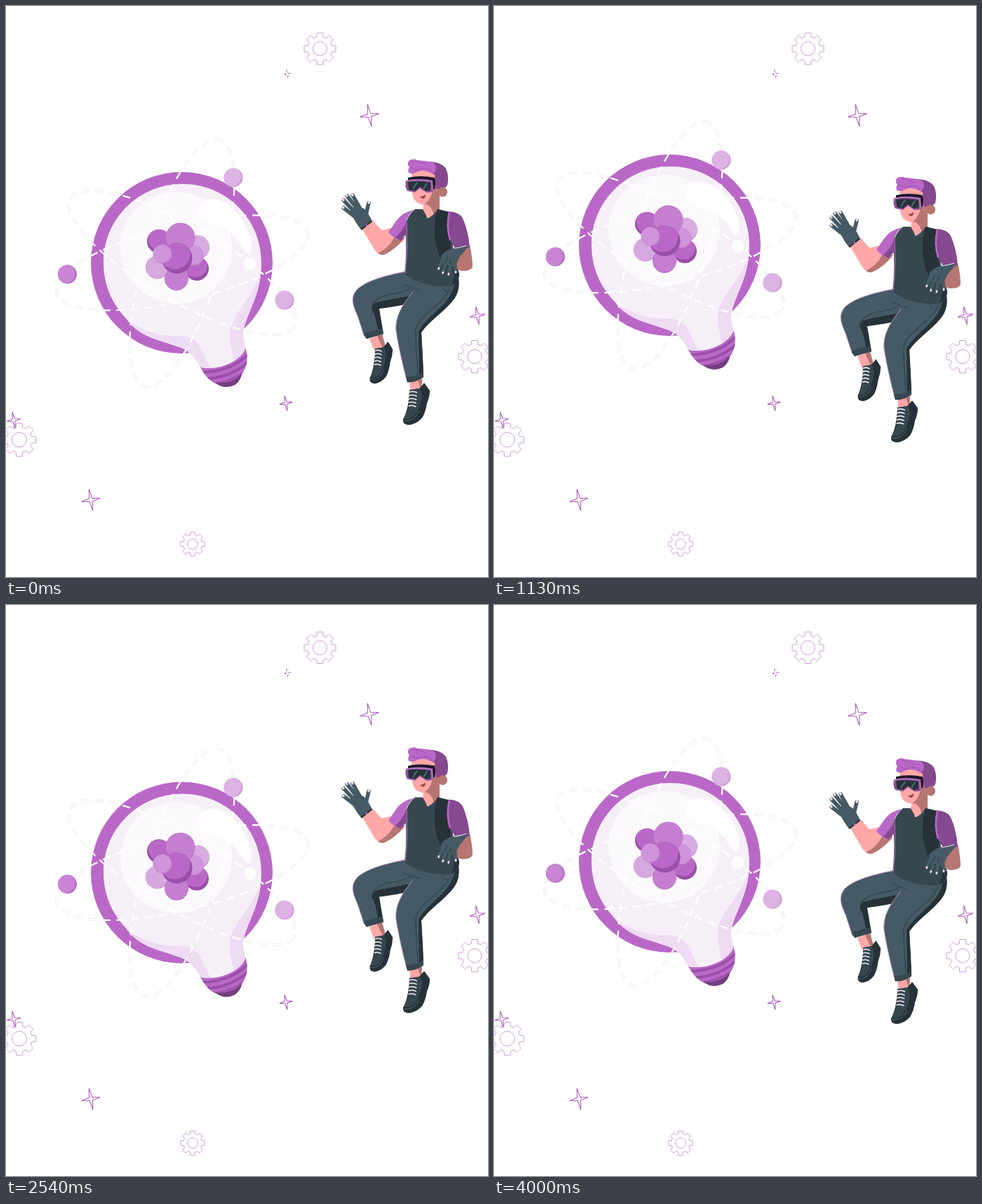
Recreate the animation shown at these times as an HTML page with a canvas. Size 687x815 px, loop 4.21 s.

```html
<!DOCTYPE html>
<html lang="en">
<head>
<meta charset="utf-8">
<title>Floating idea</title>
<style>
html, body { margin: 0; width: 100%; height: 100%; overflow: hidden; background: #fff; }
canvas { display: block; }
</style>
</head>
<body>
<canvas id="stage" width="687" height="815"></canvas>
<script>
const ctx = document.getElementById('stage').getContext('2d');
const TAU = Math.PI * 2;
const LOOP = 4210, SWING = 4000, FPS = 24, REACH = 28.5;
const PURPLE = '#ba68c8', PLUM = '#9a4fa8', DEEP = '#85498f';
const SKIN = '#ffa8a7', TAN = '#b77672';
const SLATE = '#455a64', STEEL = '#37474f', INK = '#263238';

function fill(color, d) {
  ctx.fillStyle = color;
  ctx.fill(new Path2D(d));
}

function line(color, width, d) {
  ctx.strokeStyle = color;
  ctx.lineWidth = width;
  ctx.stroke(new Path2D(d));
}

function disc(color, x, y, rx, ry = rx, turn = 0) {
  ctx.fillStyle = color;
  ctx.beginPath();
  ctx.ellipse(x, y, rx, ry, turn, 0, TAU);
  ctx.fill();
}

// Disc with a darker crescent left where the lit disc is shifted away.
function ball(x, y, r, color, shade, dx, dy) {
  ctx.save();
  ctx.beginPath();
  ctx.arc(x, y, r, 0, TAU);
  ctx.clip();
  disc(shade, x, y, r + 1);
  disc(color, x + dx, y + dy, r);
  ctx.restore();
}

function gear(x, y, r, hole) {
  ctx.strokeStyle = '#cf9ddb';
  ctx.lineWidth = 1;
  ctx.beginPath();
  for (let i = 0; i < 8; i++) {
    const a = i * TAU / 8 - TAU / 4;
    for (const [da, k] of [[-0.27, 0.76], [-0.18, 1], [0.18, 1], [0.27, 0.76]]) {
      ctx.lineTo(x + Math.cos(a + da) * r * k, y + Math.sin(a + da) * r * k);
    }
  }
  ctx.closePath();
  ctx.moveTo(x + hole, y);
  ctx.arc(x, y, hole, 0, TAU);
  ctx.stroke();
}

function star(x, y, r, color = '#a94fba') {
  ctx.save();
  ctx.translate(x, y);
  ctx.rotate(-0.18);
  ctx.strokeStyle = color;
  ctx.lineWidth = 1;
  ctx.lineJoin = 'bevel';
  ctx.beginPath();
  for (let i = 0; i < 8; i++) {
    const a = i * TAU / 8, k = i % 2 ? r * 0.2 : r * (i % 4 ? 0.86 : 1);
    ctx.lineTo(Math.sin(a) * k, -Math.cos(a) * k);
  }
  ctx.closePath();
  ctx.stroke();
  ctx.restore();
}

function backdrop() {
  gear(447.5, 61, 23, 10);
  gear(668, 500.5, 23.5, 10);
  gear(19, 619, 24, 10.5);
  gear(266, 768, 17.5, 7.5);
  star(518, 156, 16);
  star(672, 442, 13);
  star(399, 567, 11);
  star(121, 705, 15.5);
  star(11, 591, 12);
  ctx.setLineDash([2, 3]);
  star(401, 97, 6);
  ctx.setLineDash([]);
}

function orbit(deg, shift) {
  ctx.setLineDash([11.5, 8.5]);
  ctx.lineDashOffset = shift;
  ctx.beginPath();
  ctx.ellipse(251, 366.5, 184, 54, deg * TAU / 360, 0, TAU);
  // Faint rim outside the bulb, so that the white dashes show there.
  ctx.save();
  const rim = new Path2D('M0 0H687V815H0Z');
  rim.arc(250.5, 366.5, 130, 0, TAU);
  ctx.clip(rim, 'evenodd');
  ctx.strokeStyle = '#dfd3e3';
  ctx.lineWidth = 3.2;
  ctx.stroke();
  ctx.restore();
  ctx.strokeStyle = '#fff';
  ctx.lineWidth = 2.3;
  ctx.stroke();
  ctx.setLineDash([]);
}

const GLASS = 'M251.500 254C314 254 364 304 364 366C364 419 338 442 338 472L341 489' +
  'C336 504 309 521 278 516C271 506 265 494 250 488C220 477 190 473 172 447' +
  'C151 425 139 398 139 366C139 304 189 254 251.500 254Z';

function bulb() {
  disc(PURPLE, 250.5, 366.5, 129.5);

  // Screw base
  fill('#743d80', 'M294 536Q318 537 337 522Q335 535 326 541Q313 547 303 541Z');
  ctx.save();
  ctx.clip(new Path2D('M276 514Q313 515 341 487Q345 497 343 510Q341 520 335 526Q319 541 295 537Q285 531 276 514Z'));
  ctx.fillStyle = PURPLE;
  ctx.fillRect(270, 485, 80, 60);
  line(PLUM, 4, 'M276 523Q320 523 346 496');
  line(PLUM, 4, 'M282 532Q322 531 347 506');
  line(PLUM, 2.500, 'M290 539Q324 537 345 517');
  ctx.restore();

  fill('#f6eff8', GLASS);
  ctx.save();
  ctx.clip(new Path2D(GLASS));
  fill('#eedcf3', 'M158 432C186 466 220 472 252 471C280 474 276 494 297 525L270 530L230 495L165 460Z');
  fill('#eedcf3', 'M366 366C360 412 320 438 319 467C318 484 325 493 325 523L350 500L370 410Z');
  ctx.restore();
  disc('#fcf9fd', 242.5, 345, 79.5);
  fill('#fff', 'M274 293C274 279 288 274 300 276C322 280 347 311 350 341C350 353 343 355 338 347' +
    'C331 333 320 320 304 314C288 311 274 304 274 293Z');
  disc('#fff', 347.5, 368, 8.5, 9.5);

  orbit(-73, 4);
  orbit(30, -1);
  orbit(-13.5, 3);

  ball(218, 336, 17, PURPLE, PLUM, 2, -3);
  ball(273, 344.5, 17, '#d9ace1', '#cd91d8', 0, -2);
  ball(215.500, 373, 16.5, '#d7a8df', '#cd91d8', -1, -1);
  ball(272, 375, 17, PURPLE, PLUM, -2, -5);
  ball(243, 389, 17, '#c57fd1', '#b66bc4', 0, -1);
  ball(267, 356, 14.5, '#cf94da', '#c57fd1', 0, -1);
  ball(248.5, 330.5, 21, '#c57fd1', '#b66bc4', 0, -1);
  ball(243.5, 360, 22, PURPLE, PLUM, -3, -6);
  ball(223, 354, 13.5, '#cf94da', '#c57fd1', -1, -1);

  ball(324, 245, 13.5, '#ddb3e4', '#cd98d7', -2, -1);
  ball(87.5, 383, 13.5, '#c985d4', '#b873c5', -3, -1);
  ball(397, 420, 13.5, '#ddb3e4', '#cd98d7', -2, -1);
}

// Gloved fingers with pale nails; each is [base x, base y, tip x, tip y].
function fingers(list, width) {
  ctx.lineCap = 'round';
  for (const [x, y, u, v] of list) {
    line(SLATE, width, `M${x} ${y}L${u} ${v}`);
    const k = 1.5 / Math.hypot(u - x, v - y);
    line('#eadcef', width * 0.6, `M${u} ${v}l${(u - x) * k} ${(v - y) * k}`);
  }
  ctx.lineCap = 'butt';
}

function shoe(x, y, wide) {
  ctx.save();
  ctx.translate(x, y);
  ctx.scale(wide, 1);
  fill(INK, 'M9 10L23 8L30 0Q34 5 38 11Q38 20 34 29Q32 42 27 50Q20 58 9 60Q-1 60 0 52Q8 38 9 10Z');
  fill(STEEL, 'M9 11L22 8Q27 11 27 19Q25 34 18 44Q12 53 1 51Q8 39 9 28Z');
  line('#536871', 1, 'M1 54Q16 56 23 40');
  for (let i = 0; i < 5; i++) {
    line('#f3eef5', 1.6, `M${9 - i * 0.4} ${13 + i * 5}q6 -2 11 1`);
  }
  ctx.restore();
}

function legs() {
  fill(SKIN, 'M518 475L534 469L541 486L525 493Z');
  fill(TAN, 'M529 471L536 468L541 486L537 488Z');
  fill(SKIN, 'M575 536L593 532L592 550L577 554Z');
  fill(TAN, 'M587 535L593 532L592 547Z');
  shoe(518.5, 479, 0.86);
  shoe(566, 538, 1);

  const back = 'M570 379C538 385 512 393 500 405C490 417 495 428 501 442' +
    'C505 454 508 463 510 470L514 475L538 468L531 432Q561 428 583 422L608 395Z';
  fill(SLATE, back);
  line('#bd8fc8', 1, 'M570 379C538 385 512 393 500 405C490 417 495 428 501 442C505 454 508 463 510 470');
  fill(INK, 'M524 424Q550 418 585 412L582 423Q558 429 532 432L538 468L531 469Q528 444 521 431Z');
  line(STEEL, 1.5, 'M521 430Q526 417 544 412Q565 410 580 402');
  fill(STEEL, 'M510 467L536 460L538 468L514 475Z');

  const front = 'M575 388C585 396 620 400 645 387C647 402 644 414 632 426' +
    'C618 441 602 451 592 466C593 486 595 507 595 529Q585 537 572 537' +
    'C566 515 560 489 556 464C554 442 567 424 580 408Z';
  fill(SLATE, front);
  line('#bd8fc8', 1, 'M580 408C567 424 554 442 556 464C560 489 566 515 572 537');
  fill(INK, 'M645 388C647 405 643 415 632 426C617 442 602 451 592 466L595 529L589 532L588 464C603 438 637 425 640 392Z');
  line(STEEL, 1.5, 'M634 402C620 430 590 438 584 462Q584 498 588 531');
  line(STEEL, 1.2, 'M622 401Q624 409 632 407M566 397Q578 403 590 406');
  fill(STEEL, 'M570 529Q584 530 595 522L595 530Q584 538 572 537Z');
}

function torso() {
  fill(SKIN, 'M595 279L618 271L618 296L606 304L594 297Z');
  fill(TAN, 'M600 283Q612 279 618 270L618 296L609 302Q611 290 600 283Z');
  fill(STEEL, 'M583 290L594 290Q598 297 601 303Q610 299 615 290L632 294Q637 325 637 350' +
    'L646 382Q646 395 633 400Q595 402 568 383Q572 350 569 314Q572 299 583 290Z');
  fill(INK, 'M615 290L632 294L634 350L630 372Q614 360 611 327Q610 306 615 290Z');
  fill(INK, 'M642 364L646 384Q645 393 635 399Q641 383 642 364Z');
}

function raisedArm() {
  fill(SKIN, 'M507 317L522 305Q530 315 536 320L549 317L568 333Q554 347 539 354Q532 356 526 349Z');
  fill(TAN, 'M530 353Q545 346 553 331L569 330Q555 348 539 355Q534 356 530 353Z');
  fill(PURPLE, 'M582 291Q565 294 556 307L545 323Q553 332 562 335L571 325L570 308Q574 296 582 291Z');
  fill(DEEP, 'M571 306L571 325L562 335L555 330Q566 321 571 306Z');
  line(PURPLE, 1, 'M571 308Q573 350 569 382');
  fill(SLATE, 'M490 293L498 284L510 289Q518 297 522 308L507 320Q500 313 490 293Z');
  fingers([[495, 299, 481, 288], [496, 293, 481, 277], [501, 290, 486, 271],
    [506, 291, 494, 270], [513, 298, 517, 281]], 5.5);
  line(INK, 2, 'M506 319L521 307');
  disc(PURPLE, 514, 313, 1.5);
}

function loweredArm() {
  fill(TAN, 'M640 347L661 342Q665 359 665 372Q663 379 649 378L640 375Z');
  fill(DEEP, 'M631 293Q646 294 651 303Q659 321 661 345Q650 349 642 349L632 333Q627 312 631 293Z');
  line(PURPLE, 2.5, 'M632 294Q627 314 633 334');
  fill(SLATE, 'M657 342L638 345Q625 349 620 357L621 367L637 372Q643 368 646 359L656 347Z');
  fingers([[624, 357, 617, 374], [629, 361, 623, 380], [634, 363, 631, 382],
    [640, 362, 641, 379]], 4.4);
  line('#eadcef', 1.2, 'M638 346Q648 345 656 342');
  line(INK, 0.8, 'M626 366L629 358M633 369L634 361');
}

function head() {
  fill(SKIN, 'M578 234L612 234L617 264Q611 283 595 283.500Q580 282 579 266Z');
  fill(TAN, 'M609 246L617 252L618 272L610 280Q604 284 597 283Q608 273 608 260Z');
  fill(DEEP, 'M601 222Q620 222 627 232Q632 243 629 256L623 262L613 261L611 241L604 237Z');
  disc(TAN, 622.5, 265.5, 6.5, 7);
  fill(PURPLE, 'M574 221Q580 217 586 220Q602 221 610 224Q616 231 609 240Q596 233 588 236' +
    'Q579 241 574 238Q572 234 575 230Q571 226 574 221Z');
  line('#9c53aa', 1, 'M577 229Q584 236 594 232Q605 230 607 238M581 222Q594 223 599 228');
  fill('#21182b', 'M573 245Q590 241 611 245Q613 253 611 261L606 264L600 249L573 249Z');
  fill('#8e4f9c', 'M570 249Q587 245 608 249L609 264Q605 267 599 266L590 260L583 266L572 264Q568 258 570 249Z');
  line('#c78bd2', 1.2, 'M570 250Q587 246 607 250L608 263');
  fill(INK, 'M573 251Q588 249 605 252L605 263L598 264L590 258L583 264L574 262Z');
  line('#546e7a', 2, 'M580 261L586 252M595 261L600 253');
  fill('#9c4047', 'M589 272Q594 273 598 269Q598 275 594 275Z');
}

function person() {
  legs();
  torso();
  raisedArm();
  loweredArm();
  head();
}

// Triangle wave: 0, up to 1, down to -1, back to 0.
function swing(ms) {
  const frame = Math.floor((ms + 3) * FPS / 1000);
  const p = Math.min(frame / FPS * 1000 / SWING, 1);
  return p < 0.25 ? 4 * p : p < 0.75 ? 2 - 4 * p : 4 * p - 4;
}

function shifted(dy, paint) {
  ctx.save();
  ctx.translate(0, dy);
  paint();
  ctx.restore();
}

function draw(now) {
  const dy = REACH * swing(now % LOOP);
  ctx.fillStyle = '#fff';
  ctx.fillRect(0, 0, 687, 815);
  backdrop();
  shifted(-dy, bulb);
  shifted(dy, person);
}

let start;
function tick(now) {
  start ??= now;
  draw(now - start);
  requestAnimationFrame(tick);
}
draw(0);
requestAnimationFrame(tick);
</script>
</body>
</html>
```
